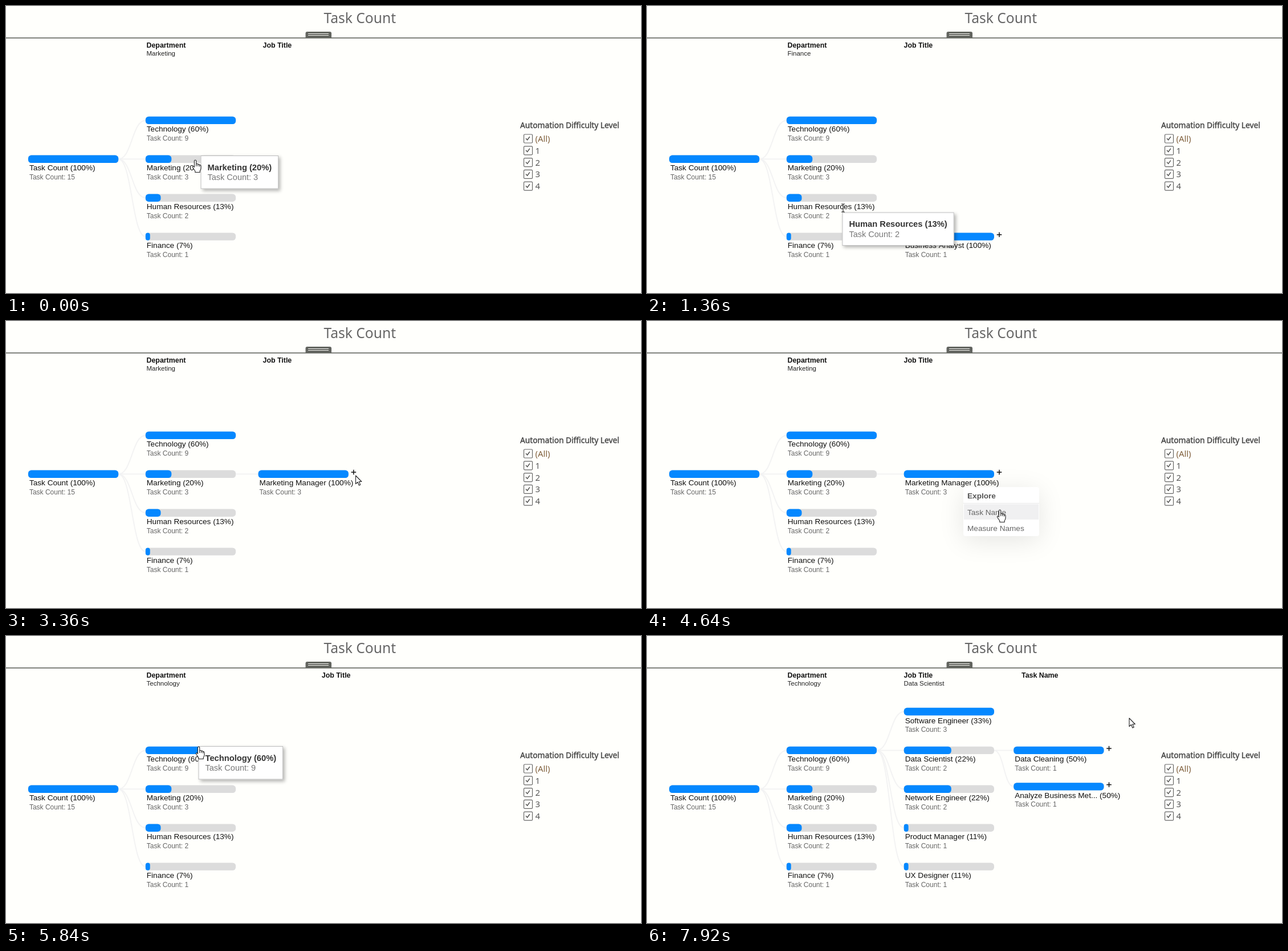
An HTML page with a canvas for the animation above (8000 ms loop, 1114 px wide and 503 px high).

```html
<!DOCTYPE html>
<html lang="en">
<head>
<meta charset="utf-8">
<title>Task Count</title>
<style>
html, body { margin: 0; width: 100%; height: 100%; overflow: hidden; background: #fffffc; }
canvas { display: block; }
</style>
</head>
<body>
<canvas id="stage" width="1114" height="503"></canvas>
<script>
const ctx = document.getElementById('stage').getContext('2d');
const LOOP = 8000, STEP = 80, MOVE = 750, TRAVEL = 600, TIP_LAG = 160;
const BAR_W = 158.3, BAR_H = 13.4, ROW = 67.9, MID = 268.3;
const BLUE = '#0588ff', GREY = '#dcdcdc', FRAME = '#62645f';
const ARIAL = '"Liberation Sans", Arial, sans-serif';
const NOTO = '"Noto Sans", sans-serif';

const colX = n => 38.9 + 205.9 * n;
const rowY = n => MID + n * ROW;
const clamp = v => Math.max(0, Math.min(1, v));
const lerp = (a, b, k) => a + (b - a) * k;
const ease = k => k < 0.5 ? 4 * k ** 3 : 1 - 4 * (1 - k) ** 3;
const smooth = k => k * k * (3 - 2 * k);
const progress = (t, start) => ease(clamp((t - start) / MOVE));
const within = (t, a, b) => t >= a && t < b;
const percent = (count, total) => `(${Math.round(100 * count / total)}%)`;

const departments = [['Technology', 9], ['Marketing', 3], ['Human Resources', 2], ['Finance', 1]];
const jobs = [['Software Engineer', 3], ['Data Scientist', 2], ['Network Engineer', 2],
  ['Product Manager', 1], ['UX Designer', 1]];
const tasks = [['Data Cleaning', 1], ['Analyze Business Met...', 1]];

// Children slide out of the bar at row `parent`; `top` is the row of the first child.
const branches = [
  { open: 600, close: 2240, col: 2, parent: 2, top: 2, items: [['Business Analyst', 1]] },
  { open: 2771, close: 5440, col: 2, parent: 0, top: 0, items: [['Marketing Manager', 3]] },
  { open: 6080, close: LOOP, col: 2, parent: -1, top: -2, items: jobs },
  { open: 7360, close: LOOP, col: 3, parent: -1, top: -1, items: tasks }
];
const menus = [{ open: 3840, close: 4880, row: 0 }, { open: 7040, close: 7360, row: -1 }];

// The pointer rests at each stop, then eases to the next one.
const stops = [
  { at: -160, x: 342, y: 263 }, { at: 0, x: 332, y: 270 },
  { at: 400, x: 338, y: 403 }, { at: 1360, x: 344, y: 354 },
  { at: 1800, x: 355, y: 274 }, { at: 3360, x: 613.5, y: 271 },
  { at: 4480, x: 619, y: 331 }, { at: 5440, x: 338, y: 194 },
  { at: 6720, x: 622, y: 198 }, { at: 7280, x: 621, y: 264 }, { at: 7920, x: 846, y: 144 }
];

const isOpen = (part, t) => within(t, part.open, part.close);

function pointerAt(t) {
  const i = stops.findIndex(s => s.at >= t);
  if (i < 1) return i ? stops.at(-1) : stops[0];
  const a = stops[i - 1], b = stops[i];
  const start = Math.max(a.at, b.at - TRAVEL);
  const k = smooth(clamp((t - start) / (b.at - start)));
  return { x: lerp(a.x, b.x, k), y: lerp(a.y, b.y, k) };
}

function hoveredDepartment({ x, y }) {
  const row = Math.floor((y - MID + 8) / ROW);
  const offset = y - rowY(row);
  const inside = within(x, colX(1), colX(1) + BAR_W) && offset < 35;
  return inside ? { item: departments[row + 1], onBar: offset < 9 } : {};
}

function pointerKind(p, t) {
  const { item, onBar } = hoveredDepartment(p);
  if (item) return onBar ? 'hand' : 'beam';
  if (menus.some(m => isOpen(m, t))) return 'hand';
  const settled = branches.some(b => isOpen(b, t) && t >= b.open + MOVE);
  const fromRow = (p.y - MID) / ROW;
  const onPlus = Math.abs(p.x - colX(2) - BAR_W - 9) < 12 && Math.abs(fromRow - Math.round(fromRow)) < 0.2;
  return settled && onPlus ? 'hand' : 'arrow';
}

function text(s, x, y, size, color, family = ARIAL, weight = '') {
  ctx.font = `${weight} ${size}px ${family}`;
  ctx.fillStyle = color;
  ctx.fillText(s, x, y);
}

function box(x, y, w, h, r, color) {
  ctx.beginPath();
  ctx.roundRect(x, y, w, h, r);
  ctx.fillStyle = color;
  ctx.fill();
}

function line(points, color, width) {
  ctx.beginPath();
  points.forEach(([x, y]) => ctx.lineTo(x, y));
  ctx.strokeStyle = color;
  ctx.lineWidth = width;
  ctx.stroke();
}

function shadowBox(x, y, w, h, r, color, blur, dx, dy) {
  ctx.save();
  ctx.shadowColor = color;
  ctx.shadowBlur = blur;
  ctx.shadowOffsetX = dx;
  ctx.shadowOffsetY = dy;
  box(x, y, w, h, r, '#fff');
  ctx.restore();
}

function link(x0, y0, x1, y1) {
  const mid = (x0 + x1) / 2;
  ctx.beginPath();
  ctx.moveTo(x0, y0);
  ctx.bezierCurveTo(mid, y0, mid, y1, x1, y1);
  ctx.strokeStyle = '#f3f3f3';
  ctx.lineWidth = 2;
  ctx.stroke();
}

function plus(x, y) {
  line([[x - 4.3, y], [x + 4.3, y]], '#111', 1.5);
  line([[x, y - 4.3], [x, y + 4.3]], '#111', 1.5);
}

// Bar lengths run from 5% for a single task to 100% for the largest sibling.
function node(x, y, [name, count], max, total, hasPlus) {
  const fill = BAR_W * (count === max ? 1 : lerp(0.05, 1, (count - 1) / (max - 1)));
  const top = y - BAR_H / 2;
  box(x, top, BAR_W, BAR_H, 5.5, GREY);
  box(x, top, fill, BAR_H, Math.min(5.5, fill / 2), BLUE);
  text(`${name} ${percent(count, total)}`, x + 2, y + 20, 13.6, '#111');
  text(`Task Count: ${count}`, x + 2, y + 35.5, 12, '#666');
  if (hasPlus) plus(x + BAR_W + 9, y - 3.3);
}

function group(items, col, parent, top, k, hasPlus) {
  const counts = items.map(item => item[1]);
  const max = Math.max(...counts), total = counts.reduce((a, b) => a + b);
  const x = lerp(colX(col - 1), colX(col), k);
  const y = i => lerp(rowY(parent), rowY(top + i), k);
  items.forEach((_, i) => link(colX(col - 1) + BAR_W, rowY(parent), x, y(i)));
  items.forEach((item, i) => node(x, y(i), item, max, total, hasPlus));
}

function header(x, title, value) {
  text(title, x, 73, 12.4, '#111', ARIAL, 'bold');
  if (value) text(value, x, 87, 11.5, '#222');
}

function headers(t) {
  const chosen = t < 360 ? 'Marketing' : t < 2240 ? 'Finance' : t < 5440 ? 'Marketing' : 'Technology';
  const named = t >= 7360;
  header(246.5, 'Department', chosen);
  header(t < 5440 ? 450.5 : lerp(657, 450.5, progress(t, 5465)), 'Job Title', named && 'Data Scientist');
  if (named) header(657, 'Task Name');
}

function titleBar() {
  text('Task Count', 557.5, 29.5, 24.6, '#666', NOTO);
  ctx.fillStyle = FRAME;
  ctx.fillRect(0, 55.2, 1114, 1.6);
  box(525.5, 45, 45.5, 11, [3, 3, 0, 0], FRAME);
  for (const y of [48.5, 51.5]) line([[530, y], [566, y]], '#f4f4f0', 1);
}

function filter() {
  const title = 'Automation Difficulty Level';
  text(title, 902, 214.3, 13.75, '#444', NOTO);
  ctx.strokeStyle = '#444';
  ctx.lineWidth = 0.4;
  ctx.strokeText(title, 902, 214.3);
  ['(All)', '1', '2', '3', '4'].forEach((label, i) => {
    const y = 232.5 + i * 20.8;
    ctx.strokeStyle = '#666';
    ctx.lineWidth = 1.2;
    ctx.beginPath();
    ctx.roundRect(908.5, y - 7.5, 15, 15, 1.5);
    ctx.stroke();
    line([[912, y - 0.5], [914.6, y + 2.3], [918.8, y - 3.5]], '#555', 1.5);
    text(label, 928.5, y + 5.5, 14.8, i ? '#555' : '#80603c', NOTO);
  });
}

function tooltip({ x, y }, [name, count]) {
  const title = `${name} ${percent(count, 15)}`;
  ctx.font = `bold 14.7px ${ARIAL}`;
  const w = ctx.measureText(title).width + 24;
  shadowBox(x, y, w, 58.5, 0, 'rgba(0,0,0,.3)', 6, 3, 3);
  ctx.strokeStyle = '#bdbdbd';
  ctx.lineWidth = 1;
  ctx.strokeRect(x + 0.5, y + 0.5, w - 1, 57.5);
  text(title, x + 12, y + 25.5, 14.7, '#333', ARIAL, 'bold');
  text(`Task Count: ${count}`, x + 12, y + 43, 14.5, '#777');
}

function menu(row, pointerY) {
  const x = 555, y = rowY(row) + 22.7;
  shadowBox(x, y, 133, 86, 4, 'rgba(0,0,0,.1)', 45, 0, 8);
  if (within(pointerY, y + 28, y + 58)) box(x + 1, y + 30, 131, 27, 0, '#f0f0f1');
  line([[x, y + 28.5], [x + 133, y + 28.5]], '#e8e8e8', 1);
  text('Explore', x + 7, y + 19.5, 13.6, '#555', ARIAL, 'bold');
  text('Task Name', x + 7, y + 48.5, 13.6, '#666');
  text('Measure Names', x + 7, y + 76.5, 13.6, '#666');
}

const shapes = {
  arrow: new Path2D('M0 0V14.5L3.4 11.3L5.8 17L8.2 16L5.8 10.5H10.3Z'),
  hand: new Path2D('M-1.6 1.5Q-1.5 0 0 0Q1.6 0 1.7 1.6V7Q4.3 5.8 4.8 7.7Q7.2 6.8 7.6 8.7' +
    'Q10 8.2 10 10.4V14.5Q9.8 17 8.2 18.8V21.5H-.2V19.3L-4.2 13.3Q-5.2 11.2-3.5 10.8Q-2.5 10.7-1.6 12.4Z' +
    'M1.7 7V11M4.8 7.7V11M7.6 8.7V11.5'),
  beam: new Path2D('M-3-7H-1L0-6L1-7H3M0-6V6M-3 7H-1L0 6L1 7H3')
};

function pointer(kind, { x, y }) {
  ctx.save();
  ctx.translate(x, y);
  ctx.lineWidth = 1.1;
  ctx.lineJoin = 'round';
  ctx.strokeStyle = '#222';
  ctx.fillStyle = '#fff';
  if (kind !== 'beam') ctx.fill(shapes[kind]);
  ctx.stroke(shapes[kind]);
  ctx.restore();
}

function draw(t) {
  ctx.fillStyle = '#fffffc';
  ctx.fillRect(0, 0, 1114, 503);
  titleBar();
  headers(t);
  filter();

  group(departments, 1, 0, -1, 1, false);
  node(colX(0), MID, ['Task Count', 15], 15, 15, false);
  const shown = branches.filter(b => isOpen(b, t));
  const lastCol = Math.max(...shown.map(b => b.col));
  for (const b of shown) group(b.items, b.col, b.parent, b.top, progress(t, b.open), b.col === lastCol);

  const tip = pointerAt(t), trail = pointerAt(t - TIP_LAG);
  menus.filter(m => isOpen(m, t)).forEach(m => menu(m.row, tip.y));
  const { item } = hoveredDepartment(trail);
  if (item) tooltip({ x: trail.x - 0.5, y: trail.y - 1 }, item);
  pointer(pointerKind(tip, t), tip);
}

function tick() {
  draw(Math.floor(performance.now() % LOOP / STEP) * STEP);
  requestAnimationFrame(tick);
}
tick();
</script>
</body>
</html>
```
